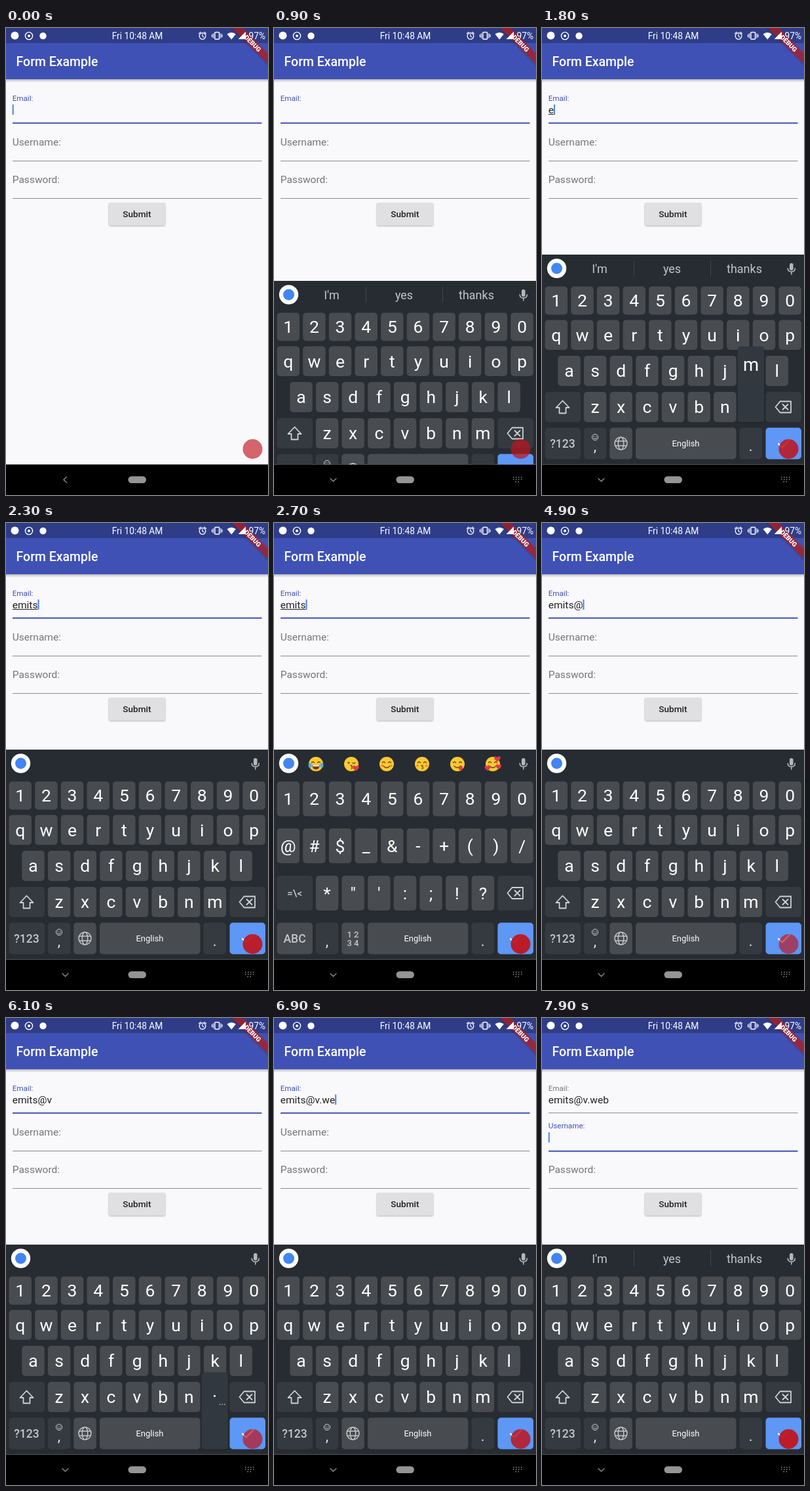
Animation, 400 px wide and 711 px high, one loop 8 s. Source, as an HTML page:

```html
<!DOCTYPE html>
<html lang="en">
<head>
<meta charset="utf-8">
<title>Form Example</title>
<style>
  html, body { margin: 0; width: 100%; height: 100%; overflow: hidden; background: #000; }
  svg { display: block; width: 100vw; height: 100vh; font-family: Roboto, sans-serif; }
  .mid { text-anchor: middle; }
  .bold { font-weight: 500; }
  .line { fill: none; stroke-linecap: round; stroke-linejoin: round; }
</style>
</head>
<body>
<svg id="stage" viewBox="0 0 400 711" xmlns="http://www.w3.org/2000/svg"></svg>
<script>
const LOOP = 8000, STEP = 100;
const KEY = '#484b4f', DARK = '#343a40', BOARD = '#272c32', INDIGO = '#3f51b5', GREY = '#757575';
const PITCH = 39.65, KEY_W = 34.5;

const esc = s => s.replace(/&/g, '&amp;').replace(/</g, '&lt;').replace(/"/g, '&quot;');
const rect = (x, y, w, h, fill, r = 0, more = '') =>
  `<rect x="${x}" y="${y}" width="${w}" height="${h}" rx="${r}" fill="${fill}" ${more}/>`;
const circle = (x, y, r, fill, more = '') => `<circle cx="${x}" cy="${y}" r="${r}" fill="${fill}" ${more}/>`;
const text = (x, y, size, fill, s, more = '') =>
  `<text x="${x}" y="${y}" font-size="${size}" fill="${fill}" ${more}>${esc(s)}</text>`;
const stroke = (d, color, w = 1.5, more = '') =>
  `<path class="line" d="${d}" stroke="${color}" stroke-width="${w}" ${more}/>`;
const group = (id, body, more = '') => `<g id="${id}" ${more}>${body}</g>`;

// Key positions by layout and character, used to place the press popup.
const keyAt = { letters: {}, symbols: {} };

function keyRow(layout, chars, x, y, h) {
  return [...chars].map((c, i) => {
    const left = x + i * PITCH, cx = left + KEY_W / 2;
    keyAt[layout][c] = { cx, y, h };
    return rect(left, y, KEY_W, h, KEY, 5) + text(cx, y + h / 2 + 9.3, 26.5, '#fff', c, 'class="mid"');
  }).join('');
}

const sideKey = (x, y, h, fill = DARK) => rect(x, y, 54.5, h, fill, 5);

function backspace(y, h) {
  const m = y + h / 2;
  return sideKey(341.5, y, h) +
    stroke(`M356.5 ${m}l7-8.5h16.5v17h-16.5zM367.5 ${m - 4}l8 8m0-8l-8 8`, '#d0d2d4', 1.8);
}

function bottomRow(layout) {
  const y = 608.5, h = 48, letters = layout === 'letters';
  keyAt[layout]['.'] = { cx: 318.7, y, h };
  let out = sideKey(4.5, y, h, letters ? DARK : KEY) +
    text(31.5, 639, 17.5, '#c4c7ca', letters ? '?123' : 'ABC', 'class="mid bold"') +
    rect(63.8, y, KEY_W, h, DARK, 5) + text(81, 644, 22, '#e4e5e6', ',', 'class="mid"') +
    rect(103.3, y, KEY_W, h, KEY, 5) + rect(143, y, 153.5, h, KEY, 5) +
    text(219.5, 637, 13, '#fff', 'English', 'class="mid"') +
    rect(301.5, y, KEY_W, h, DARK, 5) + text(318.7, 644, 22, '#e4e5e6', '.', 'class="mid"') +
    sideKey(341.5, y, h, '#5e97f6') + stroke('M361 633l5.5 5.5 11-11', '#fff', 2.2);
  if (letters) {
    out += circle(81, 623, 4.6, 'none', 'stroke="#d0d2d4"') + circle(79.3, 621.7, .8, '#d0d2d4') +
      circle(82.7, 621.7, .8, '#d0d2d4') + stroke('M78.5 624.3q2.5 2.6 5 0', '#d0d2d4', 1) +
      circle(120.5, 632.5, 9.5, 'none', 'stroke="#c4c7ca" stroke-width="1.5"') +
      '<ellipse cx="120.5" cy="632.5" rx="4.2" ry="9.5" fill="none" stroke="#c4c7ca" stroke-width="1.5"/>' +
      stroke('M112 629h17M112 636h17', '#c4c7ca');
  } else {
    out += text(120.5, 631, 13, '#c4c7ca', '1 2', 'class="mid bold"') +
      text(120.5, 643.5, 13, '#c4c7ca', '3 4', 'class="mid bold"');
  }
  return out;
}

const letterKeys = () =>
  keyRow('letters', '1234567890', 4.5, 393.5, 43) + keyRow('letters', 'qwertyuiop', 4.5, 444.5, 45.5) +
  keyRow('letters', 'asdfghjkl', 24.3, 499, 46) + sideKey(4.5, 554, 46) +
  stroke('M31.5 567.5l-10 10.5h5v8.5h10v-8.5h5z', '#d0d2d4', 1.8) +
  keyRow('letters', 'zxcvbnm', 63.8, 554, 46) + backspace(554, 46) + bottomRow('letters');

const symbolKeys = () =>
  keyRow('symbols', '1234567890', 4.5, 393.5, 53) + keyRow('symbols', '@#$_&-+()/', 4.5, 465, 53) +
  sideKey(4.5, 537, 53) + text(31.5, 569, 15.5, '#c4c7ca', '=\\<', 'class="mid bold"') +
  keyRow('symbols', '*"\':;!?', 63.8, 537, 53) + backspace(537, 53) + bottomRow('symbols');

function face(i) {
  const ink = '#6b4a12', red = '#e2384a', heart = (x, y, s) =>
    `<path transform="translate(${x} ${y}) scale(${s})" d="M0 4C-8-1-3-6 0-2C3-6 8-1 0 4z" fill="${red}"/>`;
  const arcs = stroke('M-6.5-2q2-3 4 0M2.5-2q2-3 4 0', ink, 1.4);
  const smile = stroke('M-5 3q5 5 10 0', ink, 1.4);
  const kiss = stroke('M-1 2q4 0 1 2.5q3.500 1 0 3', ink, 1.3);
  const grin = '<path d="M-6 1.500h12q-1 7-6 7t-6-7z" fill="#7c3b16"/><path d="M-5 1.500h10v2h-10z" fill="#fff"/>';
  const blush = circle(-7, 2.5, 2, '#f5913e') + circle(7, 2.5, 2, '#f5913e');
  const parts = [
    arcs + grin + '<ellipse cx="-9" cy="2" rx="2.500" ry="3.500" fill="#45aef0"/><ellipse cx="9" cy="2" rx="2.500" ry="3.500" fill="#45aef0"/>',
    circle(-4, -2, 1.5, ink) + stroke('M2-2q2 2 4 0', ink, 1.4) + kiss + heart(7, 6, 1.1),
    blush + arcs + smile,
    blush + arcs + kiss,
    arcs + smile + '<ellipse cx="5" cy="6" rx="3" ry="3.500" fill="#e2384a"/>',
    blush + arcs + smile + heart(-8, 6, 1) + heart(9, 4, 1) + heart(7, -8, 1.1)
  ][i];
  return `<g transform="translate(${64 + i * 54} 367)">${circle(0, 0, 11, '#fcc934')}${parts}</g>`;
}

const words = [['I\'m', 88], ['yes', 198.5], ['thanks', 309]]
  .map(([s, x]) => text(x, 373, 18, '#c3c6c9', s, 'class="mid"')).join('') +
  rect(140, 354, 1, 24, '#41464c') + rect(257, 354, 1, 24, '#41464c');

const keyboard = rect(0, 345, 400, 320, BOARD) + circle(22.5, 366, 14.7, '#fff') + circle(22.5, 366, 8.5, '#4285f4') +
  rect(378, 358, 5.6, 11, '#b4b7ba', 2.8) + stroke('M375.300 366q0 5 5.500 5t5.500-5M380.800 371v4', '#b4b7ba', 1.6) +
  group('words', words) + group('emoji', [0, 1, 2, 3, 4, 5].map(face).join('')) +
  group('letters', letterKeys()) + group('symbols', symbolKeys()) +
  group('popup', rect(-20, -69, 40, 115, '#333940', 4, 'id="popBox" filter="url(#soft)"') +
    text(0, -32, 27.5, '#fff', '', 'id="popText" class="mid"') +
    text(11.5, -20, 13, '#fff', '...', 'id="popMore" class="mid"'));

const statusBar = circle(13.5, 11.5, 6, '#fff') + circle(35, 12, 5.6, 'none', 'stroke="#fff" stroke-width="1.4"') +
  circle(35, 12, 2, '#fff') + circle(56.5, 12, 5.2, '#fff') +
  text(200.5, 17, 13.8, '#fff', 'Fri 10:48 AM', 'class="mid"') +
  circle(300, 12.3, 4.8, 'none', 'stroke="#fff" stroke-width="1.3"') +
  stroke('M300 9.500v3l2 1.300M294.500 8.500l2.700-2.300M305.500 8.500l-2.700-2.300', '#fff', 1.2) +
  rect(318.800, 6.500, 6.800, 10.500, 'none', 1, 'stroke="#fff" stroke-width="1.500"') +
  stroke('M316.500 8.500v6.500M328 8.500v6.500M314.500 10v3.500M330 10v3.500', '#fff', 1.2) +
  '<path d="M337.500 9.200q6.700-5 13.400 0l-6.700 8.300zM354.500 17h11.500v-11.500z" fill="#fff"/>' +
  text(370.5, 17, 13.8, '#fff', '97%');

const ribbon = `<g transform="translate(400 0) rotate(45)">${
  rect(-60, 27.2, 120, 11.7, '#b71c1c', 0, 'fill-opacity=".68" filter="url(#soft)"')}${
  text(0, 36.5, 9.9, '#fff', 'DEBUG', 'class="mid" font-weight="900"')}</g>`;

const underline = (id, y) => rect(10, y, 380.5, 1, '#8b8b8d', 0, `id="${id}"`);

document.getElementById('stage').innerHTML = `
  <defs>
    <filter id="soft" x="-20%" y="-30%" width="140%" height="170%"><feDropShadow dx="0" dy="1" stdDeviation="1.300" flood-opacity=".35"/></filter>
    <linearGradient id="shade" x2="0" y2="1"><stop stop-color="#000" stop-opacity=".25"/><stop offset="1" stop-color="#000" stop-opacity="0"/></linearGradient>
    <clipPath id="view">${rect(0, 0, 400, 664.5, '#000')}</clipPath>
  </defs>` +
  rect(0, 0, 400, 711, '#000') + rect(0, 0, 400, 664.5, '#f9f8fb') +
  rect(0, 78, 400, 5, 'url(#shade)') + rect(0, 0, 400, 78, INDIGO) + rect(0, 0, 400, 23, '#2f3d88') +
  text(15.6, 58, 19.45, '#fff', 'Form Example', 'class="bold"') +
  text(9.7, 110.5, 11.67, INDIGO, 'Email:', 'id="emailLabel"') +
  text(9.7, 129.5, 15.56, '#212121', '', 'id="email"') +
  rect(9.7, 131, 0, 1, '#212121', 0, 'id="compose"') +
  underline('emailLine', 144) + text(9.7, 179, 15.56, GREY, 'Username:', 'id="userLabel"') +
  underline('userLine', 202) + text(9.7, 236, 15.56, GREY, 'Password:') + underline('passLine', 259) +
  rect(157, 266, 86, 34.5, '#e0dfe1', 2, 'filter="url(#soft)"') +
  text(200, 288, 13.6, '#212121', 'Submit', 'class="mid bold"') +
  rect(0, 0, 2, 15.5, '#4285f4', 0, 'id="caret"') +
  ribbon + statusBar +
  `<g clip-path="url(#view)">${group('board', keyboard)}</g>` +
  rect(186.5, 682.5, 27.5, 10.5, '#949494', 5.2) +
  group('navBack', stroke('M92.500 683.500l-4.500 4.300 4.500 4.300', '#8c8c8c', 1.4)) +
  group('navDown', stroke('M86 686l4.500 4.300 4.500-4.300', '#8c8c8c', 1.4) +
    stroke('M365 684h14M365 687.300h14M368.500 690.600h7', '#8c8c8c', 1.6, 'stroke-dasharray="1.500 2.500" style="stroke-linecap:butt"')) +
  circle(376.5, 641, 15, '#bf151d', 'id="touch"');

const $ = Object.fromEntries([...document.querySelectorAll('[id]')].map(e => [e.id, e]));
const show = (el, on) => el.setAttribute('display', on ? 'inline' : 'none');
const set = (el, attrs) => { for (const k in attrs) el.setAttribute(k, attrs[k]); };
const clamp = v => Math.max(0, Math.min(1, v));
const easeOut = v => 1 - (1 - clamp(v)) ** 3;

// Time at which each character lands; its key is held just before.
const ADDRESS = 'emits@v.web';
const LANDS = [1600, 1900, 2000, 2200, 2300, 3500, 5500, 6200, 6600, 6900, 7200];
const SYMBOLS_ON = 2600, SYMBOLS_OFF = 4200, NEXT_FIELD = 7500, HOLD = 100;

function drawPopup(t, layout) {
  const i = LANDS.findIndex(at => t >= at - HOLD && t < at);
  show($.popup, i >= 0);
  if (i < 0) return;
  const c = ADDRESS[i], key = keyAt[layout][c];
  set($.popup, { transform: `translate(${Math.max(key.cx, 23)} ${key.y})` });
  set($.popBox, { height: 69 + key.h });
  $.popText.textContent = c;
  show($.popMore, c === '.');
}

function focusLine(line, y, on) {
  set(line, { y: on ? y - .3 : y, height: on ? 2 : 1, fill: on ? INDIGO : '#8b8b8d' });
}

function draw(now) {
  const t = Math.floor(now % LOOP / STEP) * STEP;
  const typed = LANDS.filter(at => t >= at).length;
  const onUser = t >= NEXT_FIELD;
  const symbols = t >= SYMBOLS_ON && t < SYMBOLS_OFF;

  const rise = easeOut((t - 700) / 400);
  set($.board, { transform: `translate(0 ${320 * (1 - rise)})` });
  show($.navBack, t < 800);
  show($.navDown, t >= 800);
  show($.letters, !symbols);
  show($.symbols, symbols);
  show($.emoji, symbols);
  show($.words, t < LANDS[1] || onUser);
  drawPopup(t, symbols ? 'symbols' : 'letters');

  $.email.textContent = ADDRESS.slice(0, typed);
  const width = typed ? $.email.getComputedTextLength() : 0;
  set($.compose, { width: typed <= 5 ? width : 0 });

  set($.emailLabel, { fill: onUser ? GREY : INDIGO });
  focusLine($.emailLine, 144, !onUser);
  focusLine($.userLine, 202, onUser);
  const lift = easeOut((t - NEXT_FIELD + STEP) / 300) * onUser;
  set($.userLabel, { y: 179 - 11.5 * lift, 'font-size': 15.56 - 3.89 * lift, fill: onUser ? INDIGO : GREY });

  const lastEdit = onUser ? NEXT_FIELD : typed ? LANDS[typed - 1] : 0;
  show($.caret, (t - lastEdit) % 1000 < 500);
  set($.caret, { x: onUser ? 9.7 : 9.7 + width, y: onUser ? 174 : 116.5 });

  set($.touch, { opacity: .8 - .15 * Math.cos((t - 100) / 5200 * 2 * Math.PI) });
}

const start = performance.now();
(function tick() {
  draw(performance.now() - start);
  requestAnimationFrame(tick);
})();
</script>
</body>
</html>
```
